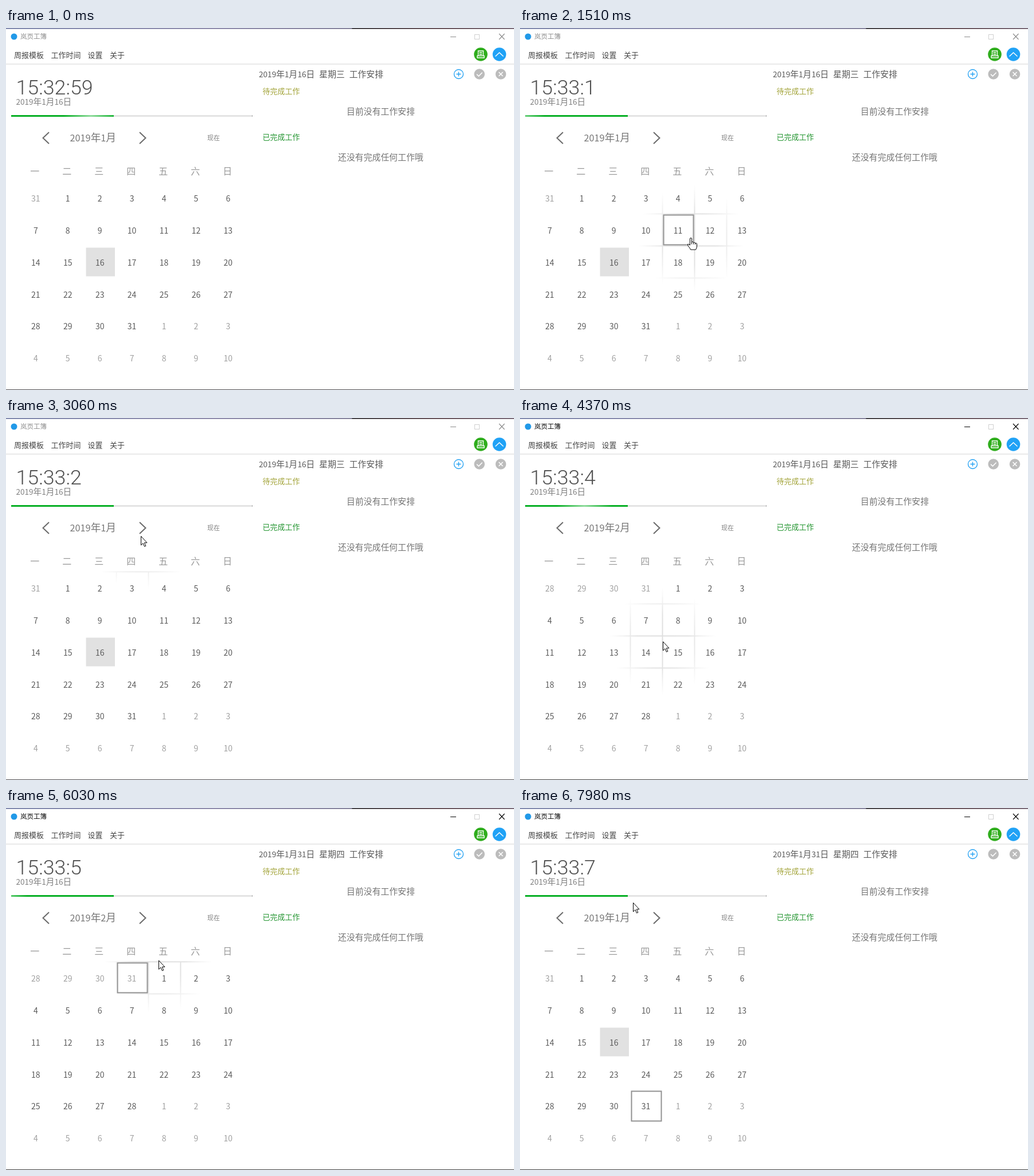
An HTML page that plays this animation: 886 by 632 pixels, repeating every 8000 ms.

```html
<!DOCTYPE html>
<html lang="zh-CN">
<head>
<meta charset="utf-8">
<title>岚页工簿</title>
<style>
html, body { margin: 0; width: 100%; height: 100%; overflow: hidden; background: #fff; }
svg { display: block; width: 886px; height: 632px; font-family: "Noto Sans CJK SC", "Noto Sans CJK", sans-serif; }
.light { font-weight: 300; }
.mid { text-anchor: middle; }
.line { fill: none; }
</style>
</head>
<body>
<svg viewBox="0 0 886 632">
  <defs>
    <linearGradient id="desk">
      <stop offset="0" stop-color="#66709c"/><stop offset=".4" stop-color="#77729a"/>
      <stop offset=".68" stop-color="#6d6a88"/><stop offset=".682" stop-color="#1d1b20"/>
      <stop offset=".85" stop-color="#4a3038"/><stop offset="1" stop-color="#5e4b5c"/>
    </linearGradient>
    <linearGradient id="shine">
      <stop offset="0" stop-color="#fff" stop-opacity="0"/>
      <stop offset=".5" stop-color="#fff" stop-opacity=".55"/>
      <stop offset="1" stop-color="#fff" stop-opacity="0"/>
    </linearGradient>
    <radialGradient id="reveal" gradientUnits="userSpaceOnUse" r="94">
      <stop offset="0" stop-color="#dedede"/>
      <stop offset=".5" stop-color="#dfdfdf" stop-opacity=".9"/>
      <stop offset="1" stop-color="#e4e4e4" stop-opacity="0"/>
    </radialGradient>
    <clipPath id="done"><rect x="9" y="152" width="179" height="3"/></clipPath>
  </defs>
  <rect width="886" height="632" fill="#fff"/>
  <rect width="886" height="1.6" fill="url(#desk)"/>
  <rect id="bottom" y="631" width="886" height="1"/>

  <circle cx="14" cy="15" r="5.5" fill="#2199e8"/>
  <g id="frame">
    <text x="25" y="19.3" font-size="11.5">岚页工簿</text>
    <path d="M775 15h10v1h-10z"/>
    <path id="close" class="line" d="M860 10l9.5 10M869.5 10l-9.5 10" stroke-width="1.1"/>
  </g>
  <rect x="817.5" y="11.5" width="8" height="8" class="line" stroke="#d0d0d0"/>

  <g font-size="13" fill="#444">
    <text x="14" y="52">周报模板</text>
    <text x="78.5" y="52">工作时间</text>
    <text x="142.5" y="52">设置</text>
    <text x="181" y="52">关于</text>
  </g>
  <rect y="62.5" width="886" height="1" fill="#d6d6d6"/>

  <circle cx="828" cy="46" r="11.8" fill="#2fad1d"/>
  <path d="M823.5 48.5v-8.5h9v8.5M822 48.5h12v3.5h-12zM825.5 43h5M825.5 46h5" class="line" stroke="#fff" stroke-width="1.3"/>
  <circle cx="860.5" cy="46" r="11.8" fill="#20a2f6"/>
  <path d="M853.5 49.5l7-6.5 7 6.5" class="line" stroke="#fff" stroke-width="1.4"/>

  <g class="line" stroke="#1d9ef2" stroke-width="1.3">
    <circle cx="789.5" cy="80.5" r="8"/><path d="M785.5 80.5h8M789.5 76.5v8"/>
  </g>
  <g fill="#bcbcbc"><circle cx="825.7" cy="80.5" r="9.3"/><circle cx="863" cy="80.5" r="9.3"/></g>
  <path d="M821 80.7l3.4 3.4 6.2-6.3M859.5 77l7 7M866.5 77l-7 7" class="line" stroke="#fff" stroke-width="1.5"/>

  <text id="head" x="441" y="85.6" font-size="14.8" fill="#5a5a5a"/>
  <text x="447.5" y="115.3" font-size="13" fill="#a2a338">待完成工作</text>
  <text x="594" y="150.6" font-size="14.9" fill="#757575">目前没有工作安排</text>
  <text x="447.5" y="195.3" font-size="13" fill="#239530">已完成工作</text>
  <text x="579" y="230.6" font-size="14.9" fill="#757575">还没有完成任何工作哦</text>

  <text id="clock" class="light" x="17.5" y="116" font-size="35.8" fill="#505050" style="font-family:Roboto,sans-serif"/>
  <text id="today" class="light" x="17.5" y="134.4" font-size="14.7" fill="#808080"/>
  <rect x="9" y="152" width="421" height="3" fill="#e4e4e4"/>
  <rect x="429" y="152" width="1" height="3" fill="#aaa"/>
  <rect x="9" y="152" width="179" height="3" fill="#09b026"/>
  <g clip-path="url(#done)"><rect id="glow" y="152" width="96" height="3" fill="url(#shine)"/></g>

  <path d="M75 182l-10.5 10L75 202M233 182l10.5 10L233 202" class="line" stroke="#6b6b6b" stroke-width="2"/>
  <text id="month" class="light" x="111.5" y="198" font-size="17.7" fill="#777"/>
  <text x="351" y="196" font-size="11" fill="#808080">现在</text>
  <g id="week" class="light mid" font-size="16" fill="#999"></g>

  <path id="grid" class="line" stroke="url(#reveal)" stroke-width="2"/>
  <rect id="mark" x="139.5" y="383.5" width="50.5" height="50" fill="#e1e1e1"/>
  <g id="days" class="mid" font-size="14"></g>
  <g class="line" stroke="#929292" stroke-width="2">
    <rect id="pick" width="52" height="52"/>
    <rect id="hover" width="52" height="52"/>
  </g>
  <g id="cursor" fill="#fff" stroke="#000" stroke-linejoin="round">
    <path id="arrow" d="M.5 .5V16L4 12.7 6.5 18.4 8.8 17.4 6.4 11.8H11z"/>
    <g id="hand">
      <path d="M-1.5 12V1q0-1.5 1.5-1.5T1.5 1V6.5q3-.8 3.2 1q2.6-.6 3 1q2.6-.4 2.8 1.5V14q0 3-2 6H-.5q-1-3-3.5-5.5q-2-3-1.5-4t4 1.5z"/>
      <path class="line" d="M1.5 6.5v4M4.7 7.5v3.2M7.7 8.5v2.5"/>
    </g>
  </g>
</svg>
<script>
const LOOP = 8000, PITCH = 56, LEFT = 25, TOP = 269;
const ACTIVE = 3160, TO_FEB = 3200, PICK_7 = 4850, PICK_31 = 5450, TO_JAN = 6480;
const $ = id => document.getElementById(id);
const show = (el, on) => el.setAttribute('visibility', on ? 'visible' : 'hidden');
const setAttrs = (el, attrs) => { for (const k in attrs) el.setAttribute(k, attrs[k]); };

// Cursor path: time, x, y
const path = [
  [640, 500, 626], [900, 420, 470], [1200, 320, 385], [1430, 298, 367], [1700, 298, 367],
  [2260, 234, 225], [2700, 236, 212], [3060, 235, 206], [3180, 237, 200], [3700, 237, 200],
  [4100, 255, 330], [4370, 249, 390], [4500, 246, 391], [4800, 222, 357], [5000, 222, 355],
  [5290, 219, 320], [5600, 219, 318], [6160, 280, 250], [6450, 360, 202], [6590, 362, 197],
  [6800, 362, 197], [7000, 316, 150], [7200, 305, 158], [7840, 214, 177], [7890, 210, 175],
  [7980, 197, 165]
];

function cursorAt(t) {
  const i = path.findIndex(p => p[0] > t);
  if (i === 0) return null;
  if (i < 0) return path[path.length - 1].slice(1);
  const [t0, x0, y0] = path[i - 1], [t1, x1, y1] = path[i];
  const k = (t - t0) / (t1 - t0);
  return [x0 + (x1 - x0) * k, y0 + (y1 - y0) * k];
}

// Digits are set slightly smaller than the Chinese characters
const mixed = (s, size) => s.replace(/\d+/g, `<tspan font-size="${size * 0.92}">$&</tspan>`);

function setHtml(el, html) {
  if (el.shown !== html) { el.innerHTML = html; el.shown = html; }
}

function drawDays(offset, length) {
  let html = '';
  for (let i = 0; i < 42; i++) {
    const n = i - offset + 1;
    const inside = n >= 1 && n <= length;
    const label = n < 1 ? n + 31 : inside ? n : n - length;
    const x = 51.8 + 55.93 * (i % 7), y = 302.8 + 55.9 * Math.floor(i / 7);
    html += `<text x="${x}" y="${y}" fill="${inside ? '#5a5a5a' : '#a0a0a0'}">${label}</text>`;
  }
  return html;
}

const january = drawDays(1, 31), february = drawDays(4, 28);

let lines = '';
for (let i = 0; i <= 7; i++) lines += `M${LEFT + PITCH * i - 0.5} ${TOP}v${PITCH * 6}`;
for (let j = 0; j <= 6; j++) lines += `M${LEFT} ${TOP + PITCH * j - 0.5}h${PITCH * 7}`;
$('grid').setAttribute('d', lines);
$('week').innerHTML = [...'一二三四五六日']
  .map((c, i) => `<text x="${50.3 + PITCH * i}" y="255.5">${c}</text>`).join('');
setHtml($('today'), mixed('2019年1月16日', 14.7));

function placeBox(el, cell) {
  show(el, cell);
  if (cell) setAttrs(el, { x: LEFT + PITCH * cell[0] + 1.5, y: TOP + PITCH * cell[1] + 1.5 });
}

function cellAt([x, y]) {
  const col = Math.floor((x - LEFT) / PITCH), row = Math.floor((y - TOP) / PITCH);
  const inCell = v => v >= 1 && v <= 54.5;
  const hit = col >= 0 && col < 7 && row >= 0 && row < 6 &&
    inCell(x - LEFT - col * PITCH) && inCell(y - TOP - row * PITCH);
  return hit ? [col, row] : null;
}

function drawCursor(t) {
  const pos = cursorAt(t);
  show($('grid'), pos);
  $('cursor').style.display = pos ? '' : 'none';
  placeBox($('hover'), pos && cellAt(pos));
  if (!pos) return;
  const [x, y] = pos;
  const onNow = x > 348 && x < 376 && y > 182 && y < 203;
  const hand = cellAt(pos) || onNow;
  $('arrow').style.display = hand ? 'none' : '';
  $('hand').style.display = hand ? '' : 'none';
  setAttrs($('cursor'), { transform: `translate(${x} ${y})` });
  setAttrs($('reveal'), { cx: x, cy: y });
}

function draw(t) {
  const sec = Math.floor((t - 110) / 1000);
  setHtml($('clock'), sec < 0 ? '15:32:59' : '15:33:' + sec);

  // Shine crosses the bar at 200 px/s, then pauses
  const phase = (t + 905) % 2275;
  setAttrs($('glow'), { x: phase * 0.2 - 81 });

  const active = t >= ACTIVE, ink = active ? '#000' : '#8a8a8a';
  setAttrs($('frame'), { fill: ink });
  setAttrs($('close'), { stroke: ink });
  setAttrs($('bottom'), { fill: active ? '#3c3c3c' : '#4c4a4e' });

  const feb = t >= TO_FEB && t < TO_JAN;
  setHtml($('month'), mixed(`2019年${feb ? 2 : 1}月`, 17.7));
  setHtml($('days'), feb ? february : january);
  show($('mark'), !feb);

  const [date, day] = t < PICK_7 ? ['1月16', '三'] : t < PICK_31 ? ['2月7', '四'] : ['1月31', '四'];
  setHtml($('head'), mixed(`2019年${date}日`, 14.8) +
    `<tspan dx="8">星期${day}</tspan><tspan dx="8">工作安排</tspan>`);

  const row = t < PICK_31 ? 1 : t < TO_JAN ? 0 : 4;
  placeBox($('pick'), t >= PICK_7 && [3, row]);
  drawCursor(t);
}

function tick() {
  draw(performance.now() % LOOP);
  requestAnimationFrame(tick);
}
tick();
</script>
</body>
</html>
```
